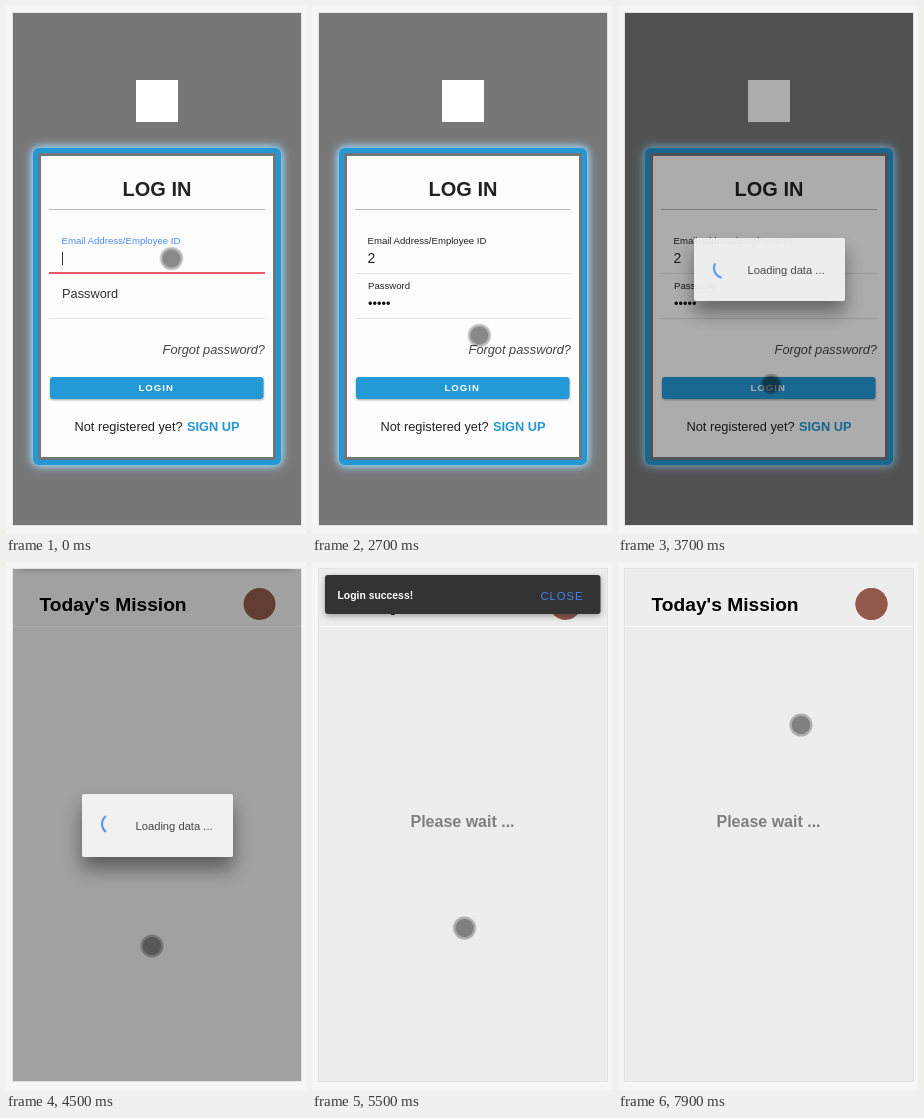
These frames come from a looping animation (300 px wide and 528 px high, 8 s). An HTML page:

```html
<!DOCTYPE html>
<html lang="en">
<head>
<meta charset="utf-8">
<title>Log in</title>
<style>
html, body { margin: 0; width: 100%; height: 100%; overflow: hidden; background: #f6f6f6; }
svg { display: block; width: 300px; height: 528px; font-family: "Liberation Sans", Arial, sans-serif; }
.b { font-weight: bold; }
.end { text-anchor: end; }
.mid { text-anchor: middle; }

/* every part shares one 8 s clock */
.a { animation: 8s linear infinite both; }
.step { animation-timing-function: step-end; }
.ease { animation-timing-function: ease-in-out; }

.mail-label { animation-name: mail-label; }
@keyframes mail-label { 0%, 10% { fill: #4a8cf7; } 11%, 100% { fill: #222; } }

.mail-text { animation-name: mail-text; }
@keyframes mail-text { 0% { opacity: 0; } 1.25%, 100% { opacity: 1; } }

.mail-line { animation-name: mail-line; }
@keyframes mail-line {
  0%, 1.25% { fill: #ee5a62; opacity: 1; }
  3.75%, 10% { fill: #3cb981; opacity: 1; }
  12%, 100% { fill: #3cb981; opacity: 0; }
}

.pass-label { animation-name: pass-label; }
@keyframes pass-label {
  0%, 10% { transform: translate(56px, 292px); fill: #333; }
  12%, 30.6% { transform: translate(56px, 283px) scale(.75); fill: #3f86f7; }
  31.2%, 100% { transform: translate(56px, 283px) scale(.75); fill: #222; }
}

.pass-line { animation-name: pass-line; }
@keyframes pass-line { 0%, 10% { opacity: 0; } 12%, 30.6% { opacity: 1; } 33.1%, 100% { opacity: 0; } }

.dots { animation-name: dots; }
@keyframes dots {
  0% { transform: none; }
  13.75% { transform: translateX(4.48px); }
  15.6% { transform: translateX(8.96px); }
  17.5% { transform: translateX(13.44px); }
  19.4% { transform: translateX(17.92px); }
  22.5%, 100% { transform: translateX(22.4px); }
}

.caret { animation-name: caret; }
@keyframes caret {
  0% { transform: none; opacity: 1; }
  1.25% { transform: translateX(8px); opacity: 1; }
  7.5% { transform: translateX(8px); opacity: 0; }
  10% { transform: translate(0, 45px); opacity: 1; }
  13.75% { transform: translate(4.5px, 45px); opacity: 1; }
  15.6% { transform: translate(9px, 45px); opacity: 1; }
  17.5% { transform: translate(13.4px, 45px); opacity: 1; }
  19.4% { transform: translate(17.9px, 45px); opacity: 1; }
  22.5% { transform: translate(22.4px, 45px); opacity: 1; }
  28.75%, 100% { transform: translate(22.4px, 45px); opacity: 0; }
}

.ripple { animation-name: ripple; }
@keyframes ripple { 0%, 41.5% { opacity: 0; } 43.75% { opacity: .15; } 46%, 100% { opacity: 0; } }

.home { animation-name: home; }
@keyframes home {
  0%, 52.5% { opacity: 0; transform: translateY(32px); animation-timing-function: ease-out; }
  56%, 100% { opacity: 1; transform: none; }
}

.shade { animation-name: shade; }
@keyframes shade { 0%, 43.75% { opacity: 0; } 45.8%, 62.6% { opacity: .32; } 65%, 100% { opacity: 0; } }

.dialog { animation-name: dialog; }
@keyframes dialog { 0%, 43.75% { opacity: 0; } 46.4%, 62.6% { opacity: 1; } 65%, 100% { opacity: 0; } }

.spin { animation-name: spin; transform-origin: 106px 262px; }
@keyframes spin { from { transform: rotate(179deg); } to { transform: rotate(4019deg); } }

.toast { animation-name: toast; }
@keyframes toast {
  0%, 55.6% { opacity: 1; transform: translateY(-60px); animation-timing-function: ease-out; }
  60.6%, 81% { opacity: 1; transform: none; }
  83.98%, 100% { opacity: 0; transform: none; }
}

.front { animation-name: front; }
@keyframes front { 0% { opacity: 0; } 83.7%, 100% { opacity: 1; } }

.pointer { animation-name: pointer; }
@keyframes pointer {
  0%, 23.1% { transform: translate(165.5px, 252.5px); }
  31.25% { transform: translate(168px, 300px); }
  37.5% { transform: translate(166px, 388px); }
  42.5% { transform: translate(161px, 384px); }
  43.75% { transform: translate(161px, 383px); }
  46.25% { transform: translate(153px, 378px); }
  51.25%, 66.25% { transform: translate(146px, 384px); animation-timing-function: ease-in; }
  76.25% { transform: translate(215px, 193px); animation-timing-function: ease-out; }
  80.6% { transform: translate(246px, 47px); }
  83.75% { transform: translate(243px, 46px); }
  87.5% { transform: translate(245px, 55px); }
  93.75% { transform: translate(178px, 169px); }
  98.75%, 100% { transform: translate(183px, 163px); }
}

.press { animation-name: press; }
@keyframes press {
  0%, 41.5% { transform: none; }
  42.5%, 47% { transform: scale(.9); }
  48%, 79.5% { transform: none; }
  80.5%, 82% { transform: scale(.9); }
  83%, 100% { transform: none; }
}

.frame { filter: drop-shadow(0 0 3px #8fcdf2) drop-shadow(0 0 5px #a9d6f2); }
.button { filter: drop-shadow(0 1px 1px rgba(0, 0, 0, .35)); }
.panel { filter: drop-shadow(0 12px 9px rgba(0, 0, 0, .42)); }
.bar { filter: drop-shadow(0 2px 3px rgba(0, 0, 0, .35)); }
</style>
</head>
<body>
<svg viewBox="0 0 300 528">
  <defs>
    <clipPath id="screen"><rect x="7" y="7" width="288" height="512"/></clipPath>
    <clipPath id="typed"><rect class="a step dots" x="26" y="288" width="30.3" height="18"/></clipPath>
    <circle id="avatar" cx="253.5" cy="42" r="16" fill="#92594c"/>
  </defs>

  <rect x="6.5" y="6.5" width="289" height="513" fill="#ededed" stroke="#e2e2e2"/>

  <g clip-path="url(#screen)">
    <g id="login">
      <rect x="7" y="7" width="288" height="512" fill="#777"/>
      <rect x="130" y="74" width="42" height="42" fill="#fff"/>
      <rect class="frame" x="29.5" y="144.5" width="243" height="312" rx="3.5" fill="#6f777c" stroke="#2398d4" stroke-width="5"/>
      <rect x="35" y="150" width="232" height="301" fill="#fdfdfd"/>

      <text class="b mid" x="151" y="190" font-size="20" fill="#222">LOG IN</text>
      <rect x="43" y="203" width="216" height="1" fill="#b9b9b9"/>

      <text class="a mail-label" x="55.5" y="238" font-size="9.6">Email Address/Employee ID</text>
      <text class="a step mail-text" x="55.5" y="257" font-size="14" fill="#222">2</text>
      <rect x="43" y="267" width="216" height="1" fill="#e2e2e2"/>
      <rect class="a mail-line" x="43" y="266" width="216" height="2"/>

      <text class="a pass-label" font-size="12.8">Password</text>
      <g clip-path="url(#typed)"><text x="56" y="301.5" font-size="12.8" fill="#111">•••••</text></g>
      <rect x="43" y="312" width="216" height="1" fill="#e2e2e2"/>
      <rect class="a pass-line" x="43" y="311" width="216" height="2" fill="#3cb981"/>
      <rect class="a step caret" x="56" y="246" width="1" height="13" fill="#333"/>

      <text class="end" x="259" y="348" font-size="12.8" font-style="italic" fill="#444">Forgot password?</text>

      <rect class="button" x="44" y="371" width="213.5" height="22" rx="3" fill="#2399d5"/>
      <rect class="a ripple" x="44" y="371" width="213.5" height="22" rx="3" fill="#fff"/>
      <text class="b" x="132.5" y="385" font-size="9.6" letter-spacing="1" fill="#fff">LOGIN</text>

      <text x="68.5" y="425" font-size="12.8" fill="#222">Not registered yet?</text>
      <text class="b" x="181" y="425" font-size="12.8" fill="#2398d4">SIGN UP</text>
    </g>

    <g class="a home">
      <rect x="7" y="7" width="288" height="512" fill="#ededed"/>
      <rect x="7" y="64" width="288" height="1" fill="#f7f7f7"/>
      <text class="b" x="33.5" y="49" font-size="19.2" fill="#000">Today's Mission</text>
      <use href="#avatar"/>
      <text class="b" x="98.5" y="265" font-size="16" fill="#7f7f7f">Please wait ...</text>
    </g>

    <rect class="a shade" x="7" y="7" width="288" height="512"/>

    <g class="a dialog">
      <rect class="panel" x="76" y="232" width="151" height="63" rx="2" fill="#f1f1f1"/>
      <g class="a spin">
        <path d="M112.1 254.1A10 10 0 0 1 112.1 269.9" fill="none" stroke="#4c93f2" stroke-width="2"/>
      </g>
      <text x="129.5" y="268" font-size="11.2" fill="#444">Loading data ...</text>
    </g>

    <g class="a toast">
      <rect class="bar" x="13" y="13" width="275.5" height="39" rx="3" fill="#333"/>
      <text class="b" x="25.5" y="37" font-size="10.4" fill="#fff">Login success!</text>
      <text x="228.5" y="37.5" font-size="11.2" letter-spacing="1" fill="#3d84f5">CLOSE</text>
    </g>

    <g class="a ease pointer">
      <g class="a press">
        <circle r="9.3" fill="#000" fill-opacity=".46"/>
        <circle r="10.4" fill="none" stroke="#000" stroke-opacity=".26" stroke-width="2.2"/>
      </g>
    </g>
    <use class="a step front" href="#avatar"/>
  </g>
</svg>
</body>
</html>
```
